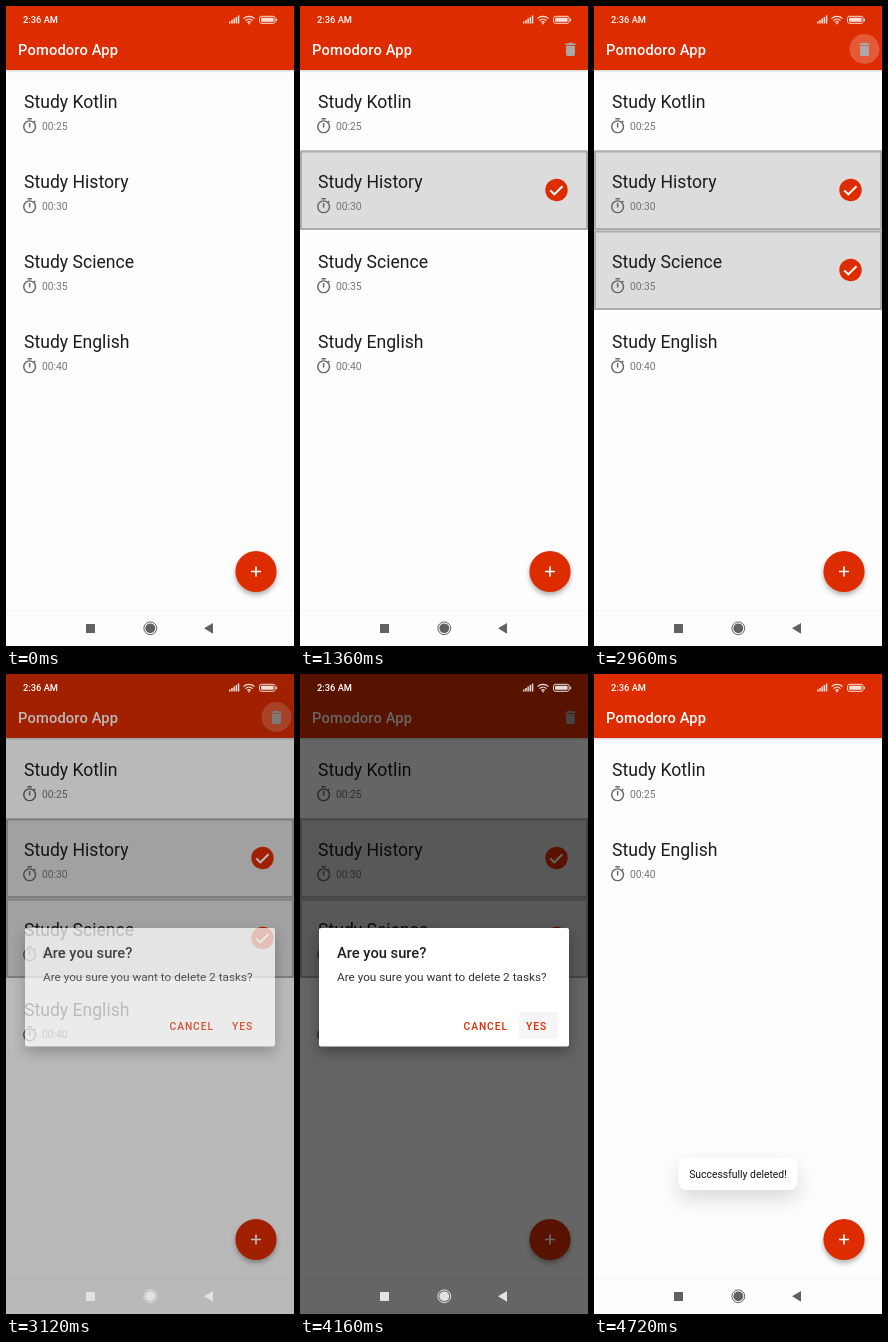
Recreate the animation shown at these times as an HTML page. Size 288 by 640 pixels, loop 5.12 s.

```html
<!DOCTYPE html>
<html lang="en">
<head>
<meta charset="utf-8">
<title>Pomodoro App</title>
<style>
  html, body { margin: 0; width: 100%; height: 100%; overflow: hidden; background: #fdfdfd; }
  svg { display: block; width: 288px; height: 640px; font-family: Roboto, sans-serif; }
  .medium { font-weight: 500; }
  .task { font-size: 17.6px; fill: #1c1c1c; }
  .time { font-size: 10.3px; fill: #757575; }
  .button { font-size: 10.29px; font-weight: 500; letter-spacing: .92px; fill: #dd2c00; }
  #bar { filter: drop-shadow(0 1px 1px rgba(0, 0, 0, .2)); }
  #fab { filter: drop-shadow(0 3px 2.5px rgba(0, 0, 0, .3)); }
  #box { filter: drop-shadow(0 6px 7px rgba(0, 0, 0, .32)); }
  #toastBox { filter: drop-shadow(0 9px 10px rgba(0, 0, 0, .14)); }
</style>
</head>
<body>
<svg id="stage" viewBox="0 0 288 640" xmlns="http://www.w3.org/2000/svg"></svg>
<script>
const LOOP = 5120;
const RED = '#dd2c00';
const ROW_TOP = 64, ROW_H = 80;
const tasks = [
  ['Study Kotlin', '00:25'],
  ['Study History', '00:30'],
  ['Study Science', '00:35'],
  ['Study English', '00:40']
];

const timerIcon = `
  <g transform="translate(14.8 47.2) scale(.735)" fill="#666">
    <circle cx="12" cy="13" r="8" fill="none" stroke="#666" stroke-width="2"/>
    <path d="M9 1h6v2H9zM11 8h2v6h-2zM17.6 6l1.4-1.4 1.4 1.4-1.4 1.4z"/>
  </g>`;

const rowMarkup = ([name, time], i) => `
  <g id="row${i}" transform="translate(0 ${ROW_TOP + i * ROW_H})">
    <rect class="fill" width="288" height="80" opacity="0"/>
    <circle class="ripple" clip-path="url(#rowClip)" cy="40" r="0" opacity="0"/>
    <rect class="edge" x="1" y="1.5" width="286" height="77.5" fill="none" stroke="#000" stroke-width="2" opacity="0"/>
    <text class="task" x="18" y="38">${name}</text>
    ${timerIcon}
    <text class="time" x="36" y="60">${time}</text>
    <g class="check" transform="translate(256.5 40) scale(0)">
      <circle r="11.2" fill="${RED}"/>
      <path d="M-6.2 .4l4 4 8.2-8.2" fill="none" stroke="#fff" stroke-width="2"/>
    </g>
  </g>`;

const bars = [2, 3.5, 5, 6.5, 8]
  .map((h, i) => `<rect x="${223 + i * 2.2}" y="${17.5 - h}" width="1.5" height="${h}"/>`).join('');

const stage = document.getElementById('stage');
stage.innerHTML = `
  <clipPath id="rowClip"><rect width="288" height="80"/></clipPath>
  <rect width="288" height="640" fill="#fdfdfd"/>
  ${tasks.map(rowMarkup).join('')}
  <rect y="604" width="288" height="1" fill="#f4f4f4"/>
  <rect id="bar" width="288" height="64" fill="${RED}"/>
  <text class="medium" x="12" y="49" font-size="14.7" letter-spacing=".15" fill="#fff">Pomodoro App</text>
  <circle id="trashRipple" cx="270.5" cy="43" r="15" fill="#fff" opacity="0"/>
  <path id="trash" transform="translate(261.7 34.5) scale(.735)" fill="#aaa"
    d="M6 19a2 2 0 0 0 2 2h8a2 2 0 0 0 2-2V7H6zM19 4h-3.5l-1-1h-5l-1 1H5v2h14z"/>
  <g id="fab">
    <circle cx="250" cy="565.5" r="20.6" fill="${RED}"/>
    <path d="M245 565.5h10M250 560.5v10" stroke="#fff" stroke-width="1.7"/>
  </g>
  <rect id="scrim" width="288" height="640" opacity="0"/>

  <g fill="#fff">
    <text class="medium" x="17" y="17" font-size="9.3">2:36 AM</text>
    <g opacity=".85">
      ${bars}
      <g fill="none" stroke="#fff" stroke-width="1.2">
        <path d="M237.5 12.6a8 8 0 0 1 11 0M239.4 14.6a5.2 5.2 0 0 1 7.2 0M241.2 16.4a2.7 2.7 0 0 1 3.6 0"/>
        <rect x="253.5" y="10.3" width="15.6" height="7" rx="2" stroke-width="1"/>
      </g>
      <circle cx="243" cy="17.4" r=".9"/>
      <rect x="255" y="11.8" width="12.6" height="4" rx=".8"/>
      <rect x="269.9" y="12.4" width="1.2" height="2.8" rx=".5"/>
    </g>
  </g>
  <g id="nav">
    <rect x="80" y="618" width="9" height="9"/>
    <circle cx="144.3" cy="622.3" r="4.9"/>
    <circle cx="144.3" cy="622.3" r="6.4" fill="none" stroke-width="1"/>
    <path d="M198 622.3l9-5.4v10.8z"/>
  </g>

  <g id="dialog" opacity="0">
    <rect id="box" x="19" y="254" width="250" height="118.5" rx="2" fill="#fff"/>
    <rect id="yesRipple" x="219" y="338" width="39" height="27" rx="2" opacity="0"/>
    <text class="medium" x="37" y="284" font-size="14.7" fill="#202020">Are you sure?</text>
    <text x="37" y="307" font-size="11.76" fill="#333">Are you sure you want to delete 2 tasks?</text>
    <text class="button" x="163.5" y="355.5">CANCEL</text>
    <text class="button" x="226" y="355.5">YES</text>
  </g>

  <g id="toast" opacity="0">
    <rect id="toastBox" x="-59.5" y="-16" width="119" height="32" rx="8" fill="#fff"/>
    <text y="3.8" text-anchor="middle" font-size="10.4" fill="#111">Successfully deleted!</text>
  </g>`;

const $ = id => document.getElementById(id);
const ramp = (t, a, b) => Math.min(1, Math.max(0, (t - a) / (b - a)));
const easeOut = u => 1 - (1 - u) ** 3;
const fade = (el, v) => el.setAttribute('opacity', v.toFixed(3));
const show = (el, on) => el.setAttribute('visibility', on ? 'visible' : 'hidden');

const rows = tasks.map((_, i) => {
  const el = $('row' + i), part = c => el.querySelector('.' + c);
  return { el, fill: part('fill'), ripple: part('ripple'), edge: part('edge'),
           check: part('check'), name: part('task'), time: part('time') };
});

// press: ripple start, pick: selection, fade: ripple release
const picks = [
  { row: 1, press: 620, pick: 1000, popEnd: 1170, fade: [1060, 1200] },
  { row: 2, press: 1820, pick: 1890, popEnd: 2070, fade: [2040, 2280] }
];
const DELETED = 4260, REBOUND = 4360;

function drawPick(t, p) {
  const r = rows[p.row];
  const grow = easeOut(ramp(t, p.press, p.press + 220));
  r.ripple.setAttribute('cx', 144 + 81 * (1 - grow));
  r.ripple.setAttribute('r', 150 * (.3 + .7 * grow));
  fade(r.ripple, .13 * ramp(t, p.press, p.press + 75) * (1 - ramp(t, ...p.fade)));

  const on = t >= p.pick;
  const gone = t >= DELETED;
  fade(r.fill, !on ? 0 : gone ? .3 * (1 - ramp(t, 4340, 4600)) : .13);
  fade(r.edge, on && !gone ? .22 : 0);
  const u = ramp(t, p.pick, p.popEnd);
  const size = u * u * (3 - 2 * u) * (1 - ramp(t, 4340, 4460));
  r.check.setAttribute('transform', `translate(256.5 40) scale(${size})`);
}

function render(t) {
  picks.forEach(p => drawPick(t, p));
  const [name, time] = tasks[t < REBOUND ? 1 : 3];
  rows[1].name.textContent = name;
  rows[1].time.textContent = time;
  show(rows[2].el, t < DELETED);
  show(rows[3].el, t < DELETED);

  show($('trash'), t >= 1000 && t < DELETED);
  fade($('trashRipple'), .22 * ramp(t, 2840, 2960) * (1 - ramp(t, 3160, 3320)));

  fade($('scrim'), .6 * ramp(t, 3000, 3270) * (1 - ramp(t, 4210, 4375)));
  fade($('dialog'), ramp(t, 3000, 3170) * (1 - ramp(t, 4200, 4340)));
  fade($('yesRipple'), .06 * ramp(t, 4110, 4200));

  const light = t >= 3040 && t < 4280;
  $('nav').setAttribute('fill', light ? '#e2e2e2' : '#616161');
  $('nav').setAttribute('stroke', light ? '#e2e2e2' : '#616161');
  $('nav').setAttribute('stroke-width', 0);

  const u = ramp(t, 4270, 4520), p = easeOut(u);
  $('toast').setAttribute('transform', `translate(144 ${500 + 31 * (1 - p)}) scale(${.38 + .62 * p})`);
  fade($('toast'), Math.min(1, u * 4.6));
}

const start = performance.now();
function tick() {
  render((performance.now() - start) % LOOP);
  requestAnimationFrame(tick);
}
tick();
</script>
</body>
</html>
```
